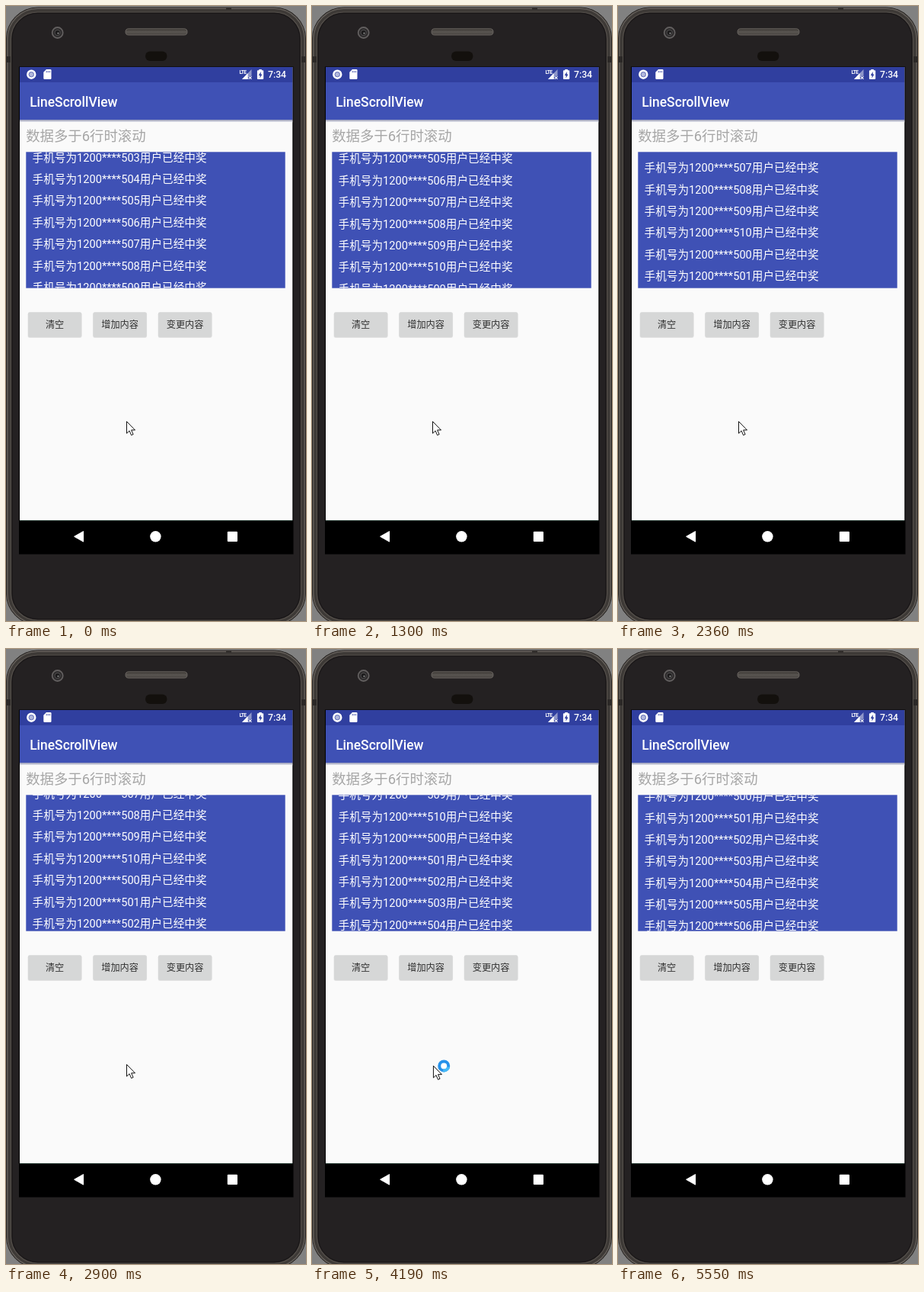
Recreate the animation shown at these times as an HTML page. Size 394 px wide and 806 px high, loop 5.65 s.

```html
<!DOCTYPE html>
<html lang="zh-CN">
<head>
<meta charset="utf-8">
<style>
  html, body { margin: 0; width: 100%; height: 100%; overflow: hidden; background: #818181; }
  svg { display: block; width: 394px; height: 806px; }
  text { font-family: Roboto, "Noto Sans CJK SC", "Noto Sans CJK", sans-serif; white-space: pre; }
</style>
</head>
<body>
<svg id="stage" viewBox="0 0 394 806" xmlns="http://www.w3.org/2000/svg">
  <defs>
    <clipPath id="listClip"><rect x="26.3" y="191.3" width="340.4" height="178.4"/></clipPath>
    <linearGradient id="shade" x2="0" y2="1">
      <stop offset="0" stop-color="#8b8fae"/><stop offset="1" stop-color="#fafafa"/>
    </linearGradient>
    <linearGradient id="grille" x2="0" y2="1">
      <stop offset="0" stop-color="#37332f"/><stop offset=".5" stop-color="#5a5652"/><stop offset="1" stop-color="#45413e"/>
    </linearGradient>
  </defs>

  <!-- Phone body -->
  <rect x=".5" y="2" width="393" height="809" rx="41" fill="#3d3936" stroke="#24211f"/>
  <rect x="1.8" y="3.3" width="390.4" height="806.4" rx="40" fill="none" stroke="#645f5a" stroke-width="1.4"/>
  <rect x="6.5" y="8" width="381" height="797" rx="35" fill="#242122" stroke="#55504b" stroke-width="1.2"/>
  <rect x="8" y="9.5" width="378" height="794" rx="34" fill="none" stroke="#191617"/>
  <path d="M289 2.5h7v2h-7zM0 66h6v8H0zM388 66h6v8h-6z" fill="#2c2927"/>
  <circle cx="67.7" cy="35" r="7" fill="#2b292a" stroke="#625f5f" stroke-width="1.8"/>
  <circle cx="67.7" cy="35" r="3.6" fill="#1b1a1b" stroke="#4b494a" stroke-width="1.2"/>
  <circle cx="68.5" cy="35.7" r="1.2" fill="#777"/>
  <rect x="157" y="29.8" width="81" height="8.2" rx="4.1" fill="url(#grille)" stroke="#6a6561"/>
  <rect x="183" y="59.5" width="28.5" height="12.5" rx="6.2" fill="#13100d"/>

  <!-- Screen -->
  <rect x="17" y="79.5" width="360.5" height="639" fill="#000"/>
  <rect x="18" y="80" width="358.3" height="594" fill="#fafafa"/>
  <rect x="18" y="80" width="358.3" height="20" fill="#303f9f"/>
  <rect x="18" y="100" width="358.3" height="49.2" fill="#3f51b5"/>
  <rect x="18" y="149.2" width="358.3" height="3.2" fill="url(#shade)"/>
  <path d="M18 674.4h358.3" stroke="#284238" stroke-width=".8"/>

  <!-- Status icons -->
  <circle cx="33.3" cy="89.7" r="4.9" fill="#b3b9dc" stroke="#fff" stroke-width="2.6"/>
  <circle cx="33.3" cy="89.7" r="3.1" fill="none" stroke="#6873ba"/>
  <path d="M53 83h5.2q1.3 0 1.3 1.3v10.4q0 1.3-1.3 1.3h-7.6q-1.3 0-1.3-1.3v-8z" fill="#fff"/>
  <path d="M53.2 85v2.3M55.3 85v2.3M57.4 85v2.3" stroke="#303f9f" stroke-width=".8"/>
  <path d="M322.5 83v13H310z" fill="#8f97ca"/>
  <path d="M317.6 88v8H310z" fill="#fff"/>
  <path d="M318.8 92.3l3.6 3.6m0-3.6l-3.6 3.6" stroke="#303f9f" stroke-width="2.6"/>
  <path d="M318.8 92.3l3.6 3.6m0-3.6l-3.6 3.6" stroke="#fff" stroke-width="1.1"/>
  <text x="306.5" y="89" font-size="6.6" font-weight="700" letter-spacing="-.6" fill="#fff">LTE</text>
  <path d="M332.3 83v1.2h-1.4q-1 0-1 1v9.8q0 1 1 1h6.3q1 0 1-1v-9.8q0-1-1-1h-1.4V83z" fill="#fff"/>
  <path d="M334.7 86l-3 5.1h1.8v3.5l3-5.2h-1.8z" fill="#303f9f"/>
  <text x="344" y="94.4" font-size="12.2" font-weight="500" fill="#fff">7:34</text>

  <text x="31.2" y="131.6" font-size="17.43" font-weight="500" fill="#fff">LineScrollView</text>
  <text x="26.2" y="177.4" font-size="18.4" fill="#a6a6a6">数据多于6行时滚动</text>

  <rect x="26.3" y="191.3" width="340.4" height="178.4" fill="#3f51b5"/>
  <g clip-path="url(#listClip)"><g id="rows" font-size="14.64" fill="#fff"></g></g>
  <g id="buttons" font-size="12.2" text-anchor="middle"></g>

  <!-- Navigation -->
  <path d="M89.6 695.3l12-6.8v13.6z" fill="#fff" stroke="#fff" stroke-linejoin="round"/>
  <circle cx="196.4" cy="695.3" r="7.2" fill="#fff"/>
  <rect x="290.8" y="688.8" width="13.2" height="13.2" rx="1" fill="#fff"/>

  <g id="pointer">
    <path d="M.5.5v15.6l3.6-3.4 2.5 5.8 2.5-1.1-2.5-5.6h4.9z" fill="#fff" stroke="#111" stroke-width="1"/>
    <g id="busy" transform="translate(14.3 .6)">
      <circle r="6" fill="#fff" stroke="#2691ea" stroke-width="4"/>
      <path id="glint" d="M-6 0A6 6 0 0 1 0-6" fill="none" stroke="#46b9f5" stroke-width="4"/>
    </g>
  </g>
</svg>

<script>
const LOOP = 5650;
const PITCH = 28.38, FIRST_BASELINE = 203.6, SCROLL_STEP = 2.5;
const STEPS_PER_RUN = 10;
// First and last tick of each run of ten scroll steps.
const RUNS = [[60, 580], [640, 1180], [1240, 1780], [1840, 2360], [2420, 2950],
  [3010, 3540], [3600, 4130], [4190, 4730], [4790, 5320], [5380, 5910]];
const BUSY_START = 3300, MOVE_START = 4100, MOVE_MID = 4730, MOVE_END = 5130;

const $ = id => document.getElementById(id);
function add(parent, tag, attrs, text = '') {
  const node = document.createElementNS('http://www.w3.org/2000/svg', tag);
  for (const key in attrs) node.setAttribute(key, attrs[key]);
  node.textContent = text;
  return parent.appendChild(node);
}

for (let i = -1; i < 17; i++) {
  const number = 500 + (i + 14) % 11;
  add($('rows'), 'text', { x: 34.6, y: FIRST_BASELINE + i * PITCH }, `手机号为1200****${number}用户已经中奖`);
}

['清空', '增加内容', '变更内容'].forEach((label, i) => {
  const x = 29 + i * 85.5;
  add($('buttons'), 'rect', { x: x - .4, y: 401.8, width: 71, height: 33.2, rx: 2.4, fill: '#e3e3e3' });
  add($('buttons'), 'rect', { x, y: 401.2, width: 70.2, height: 32.8, rx: 2, fill: '#d6d7d7' });
  add($('buttons'), 'text', { x: x + 35.1, y: 422.1, fill: '#303030' }, label);
});

function tickAt(t) {
  let run = RUNS.length - 1;
  while (run >= 0 && t < RUNS[run][0]) run--;
  if (run < 0) return { step: 0, time: 0 };
  const [start, end] = RUNS[run];
  const gap = (end - start) / (STEPS_PER_RUN - 1);
  const n = Math.min(STEPS_PER_RUN - 1, Math.floor((t - start) / gap + 1e-6));
  return { step: run * STEPS_PER_RUN + n + 1, time: start + n * gap };
}

const progress = (t, from, to) => Math.max(0, Math.min(1, (t - from) / (to - from)));

function render(t) {
  const { step, time } = tickAt(t);
  $('rows').setAttribute('transform', `translate(0 ${-step * SCROLL_STEP})`);

  const drift = progress(time, MOVE_START, MOVE_MID) ** 2;
  const leave = progress(time, MOVE_MID, MOVE_END);
  const x = 158 + 46 * drift + 108 * leave;
  const y = 544 + 90 * drift + 182 * leave;
  $('pointer').setAttribute('transform', `translate(${x} ${y})`);
  $('pointer').style.display = leave < 1 ? '' : 'none';
  $('busy').style.display = time >= BUSY_START ? '' : 'none';
  $('glint').setAttribute('transform', `rotate(${(time - 3660) * .36})`);
}

const origin = performance.now();
function loop() {
  render((performance.now() - origin) % LOOP);
  requestAnimationFrame(loop);
}
loop();
</script>
</body>
</html>
```
